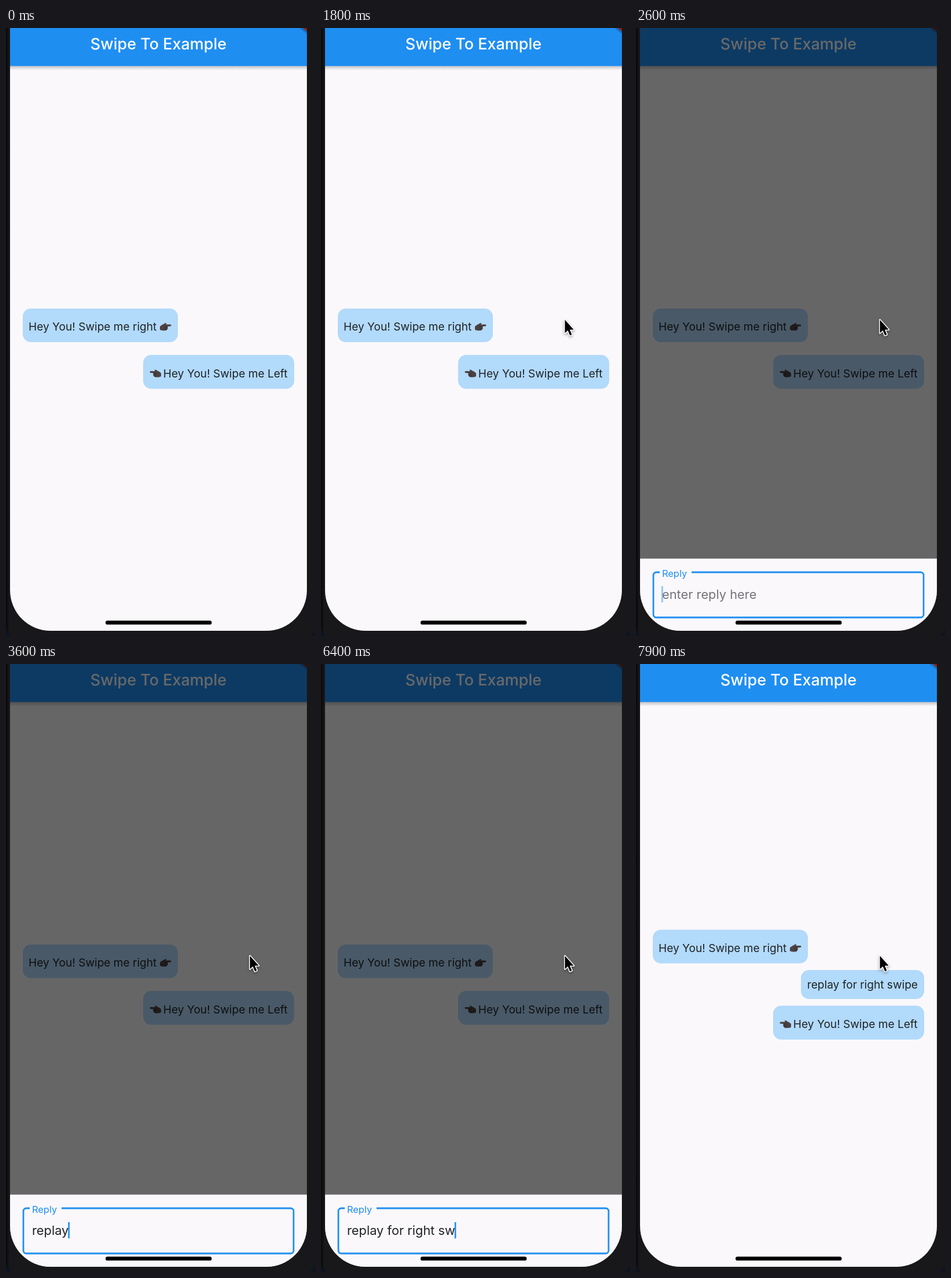
Write an HTML page with a canvas that moves like this. It is 534 by 1049 pixels and loops after 8 s.

```html
<!DOCTYPE html>
<html lang="en">
<head>
<meta charset="utf-8">
<title>Swipe To Example</title>
<style>
  html, body { margin: 0; height: 100%; overflow: hidden; background: #18181a; }
  canvas { display: block; width: 534px; height: 1049px; }
</style>
</head>
<body>
<canvas></canvas>
<script>
const LOOP = 8000, STEP = 100;
const W = 534, H = 1049;
const BLUE = '#1f8ef1', PAPER = '#faf8fb', INK = '#1f2226', BUBBLE = '#b2dafb';
const BODY = 19.1, FIELD = 21.8;
const REPLY = 'replay for right swipe';
const SENT = 7700;

// Moment at which each letter of the reply is typed
const KEYS = [3100, 3200, 3300, 3400, 3500, 3600, 3800, 3900, 4000, 4100, 4300,
  5400, 5500, 5600, 5700, 5800, 5900, 6000, 6400, 6600, 6900, 7100];

const canvas = document.querySelector('canvas');
const ratio = window.devicePixelRatio || 1;
canvas.width = W * ratio;
canvas.height = H * ratio;
const c = canvas.getContext('2d');

const clamp = x => Math.max(0, Math.min(1, x));
const span = (t, from, to) => clamp((t - from) / (to - from));
const smooth = x => x * x * (3 - 2 * x);
const mix = (a, b, k) => a + (b - a) * k;

function rect(x, y, w, h, color) {
  c.fillStyle = color;
  c.fillRect(x, y, w, h);
}

function box(x, y, w, h, r, color) {
  c.beginPath();
  c.roundRect(x, y, w, h, r);
  c.fillStyle = color;
  c.fill();
}

function text(str, x, y, size, color, align = 'left', weight = 400) {
  c.font = `${weight} ${size}px Inter, sans-serif`;
  c.textAlign = align;
  c.fillStyle = color;
  c.fillText(str, x, y);
}

function shape(path, color) {
  c.fillStyle = color;
  c.fill(new Path2D(path));
}

// Pointing hand, 20 px wide; dir -1 mirrors it
function hand(x, y, dir) {
  c.save();
  c.translate(x, y);
  c.scale(dir, 1);
  shape('M0 6 Q3 3 6 2 Q9 -.5 11 0 Q12 1 10 2.5 L18.5 2.6 Q20.5 4 18.5 5.5 L13 6 ' +
    'Q14.5 7 13.5 8.5 Q14 10.5 12.5 11 Q12 13 9 13 L5 13 Q2 12.5 0 11.5 Z', '#4b4141');
  c.strokeStyle = '#2e2828';
  c.lineWidth = 0.7;
  c.stroke(new Path2D('M8 6 L13 6 M8 8.6 L13 8.6 M8 11 L12 11'));
  c.restore();
}

function device() {
  rect(0, 0, W, H, '#18181a');
  const edge = c.createLinearGradient(0, 0, 7, 0);
  edge.addColorStop(0, '#08080b');
  edge.addColorStop(1, '#1b1b1e');
  c.fillStyle = edge;
  c.fillRect(0, 0, 7, H);
  shape('M0 1036 Q3 1044 9 1049 L0 1049 Z M534 1036 Q531 1044 525 1049 L534 1049 Z', '#0c1422');
}

function header() {
  const shade = c.createLinearGradient(0, 66, 0, 73);
  shade.addColorStop(0, 'rgba(0,0,0,.2)');
  shade.addColorStop(1, 'rgba(0,0,0,0)');
  c.fillStyle = shade;
  c.fillRect(7, 65, 513, 8);
  rect(7, 0, 513, 65.6, BLUE);
  text('Swipe To Example', 263.5, 37, 27, '#fff', 'center', 500);
  shape('M507 0 L520 0 L520 10 Z', 'rgba(10,40,80,.3)');
  shape('M513 0 L520 0 L520 6 Z', '#8c2018');
}

function messages(t) {
  const sent = t >= SENT;
  const shift = sent ? 25.5 : 0;
  const slide = 85 * Math.sin(Math.PI * span(t, 1300, 1750));

  c.save();
  c.translate(slide, -shift);
  box(29, 484, 268, 58, 14, BUBBLE);
  text('Hey You! Swipe me right', 39, 522, BODY, INK);
  hand(266, 509, 1);
  c.restore();

  if (sent) {
    box(285, 528, 213, 50, 14, BUBBLE);
    text(REPLY, 487, 559.5, BODY, INK, 'right');
  }

  c.save();
  c.translate(0, shift);
  box(237, 564, 261, 58.5, 14, BUBBLE);
  text('Hey You! Swipe me Left', 486.5, 602.5, BODY, INK, 'right');
  hand(268, 589.5, -1);
  c.restore();
}

function caretAlpha(t, lastKey) {
  if (t >= SENT) return 0;
  if (lastKey) return 1 - span(t, lastKey + 580, lastKey + 880);
  return t < 2900 ? 1 - span(t, 2450, 2750) : span(t, 2900, 3100);
}

function sheet(t, drop) {
  const typed = KEYS.filter(k => k <= t).length;
  const value = REPLY.slice(0, typed);
  const tint = t > SENT ? '#2a82c6' : BLUE;

  c.save();
  c.translate(0, drop);
  rect(7, 915.5, 513, 140, PAPER);

  c.beginPath();
  c.moveTo(96, 939);
  c.arcTo(497, 939, 497, 1017, 5);
  c.arcTo(497, 1017, 30, 1017, 5);
  c.arcTo(30, 1017, 30, 939, 5);
  c.arcTo(30, 939, 41, 939, 5);
  c.lineTo(41, 939);
  c.strokeStyle = tint;
  c.lineWidth = t > SENT ? 2 : 2.8;
  c.stroke();

  text('Reply', 45, 947, 16.4, tint);
  text(value || 'enter reply here', 45, 984.5, FIELD, value ? INK : '#757378');
  c.globalAlpha = caretAlpha(t, KEYS[typed - 1]);
  rect(44 + c.measureText(value).width, 963, 2.6, 28, BLUE);
  c.restore();
}

function pointer(t) {
  if (t < 100) return;
  const come = smooth(span(t, 250, 1150));
  const drag = smooth(span(t, 1200, 1700));
  const x = mix(mix(467, 150, come), 421.5, drag);
  const y = mix(mix(832, 512, come), 503.5, drag);
  const arrow = new Path2D('M0 0 L0 22.8 L5 18.2 L8.7 26.8 L12 25.4 L8.4 16.9 L15.3 16.9 Z');
  c.save();
  c.translate(x, y);
  c.shadowColor = 'rgba(0,0,0,.35)';
  c.shadowBlur = 4 * ratio;
  c.shadowOffsetY = 2 * ratio;
  c.strokeStyle = '#fff';
  c.lineJoin = 'round';
  c.lineWidth = 3;
  c.stroke(arrow);
  c.shadowColor = 'transparent';
  c.fillStyle = '#000';
  c.fill(arrow);
  c.restore();
}

function draw(t) {
  const open = 1 - (1 - span(t, 1840, 1990)) ** 2;
  const close = span(t, 7768, 7868);

  c.setTransform(ratio, 0, 0, ratio, 0, 0);
  device();

  c.save();
  c.beginPath();
  c.roundRect(7, -100, 513, 1140, [0, 0, 70, 70]);
  c.clip();
  rect(7, 0, 513, 1040, PAPER);
  header();
  messages(t);
  if (open > 0 && close < 1) {
    rect(7, 0, 513, 1040, `rgba(0,0,0,${0.588 * open * (1 - close ** 2.4)})`);
    sheet(t, 125 * (1 - open + close ** 3));
  }
  box(172, 1022.5, 183.5, 6.8, 3.4, '#000');
  c.restore();

  pointer(t);
}

// The picture advances ten times a second
function tick(now) {
  draw(Math.floor((now % LOOP) / STEP) * STEP);
  requestAnimationFrame(tick);
}
tick(0);
</script>
</body>
</html>
```
